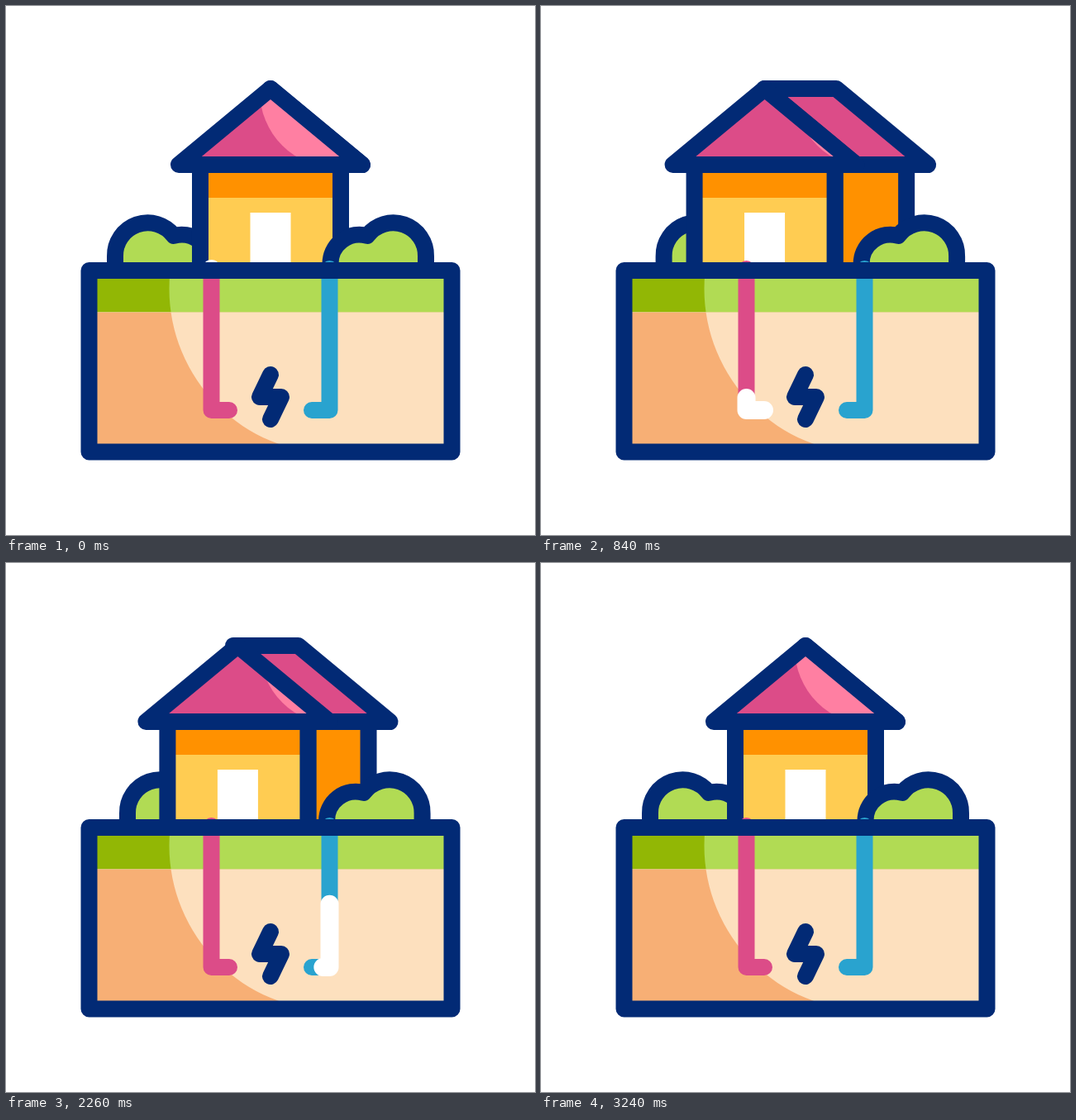
Animation, 640 px wide and 640 px high, one loop 3.6 s. Source, as an HTML page with a canvas:

```html
<!DOCTYPE html>
<html lang="en">
<head>
<meta charset="utf-8">
<title>Geothermal house</title>
<style>
html, body { margin: 0; width: 100%; height: 100%; overflow: hidden; background: #fff; }
canvas { display: block; width: 640px; height: 640px; }
</style>
</head>
<body>
<canvas width="640" height="640"></canvas>
<script>
const ctx = document.querySelector('canvas').getContext('2d');
const LOOP = 3600, FLOW = 820;
const NAVY = '#022a75', PINK = '#dc4c88', ROSE = '#ff7fa2', ORANGE = '#ff9100',
  YELLOW = '#ffcc52', GREEN = '#b1db54', MOSS = '#92b705', CLAY = '#f7af75',
  SAND = '#fde0be', BLUE = '#29a3cf', WHITE = '#fff';

const bush = new Path2D('M508 320V303A39.5 39.5 0 0 0 437 278A35 35 0 0 0 392.5 312V320Z');
const bolt = new Path2D('M0 -27L-13 0H13L0 27');
const hotPipe = new Path2D('M248.5 318V489H270');
const coldPipe = new Path2D('M370 489H391.5V318');
const BOLT_LENGTH = 86, PIPE_LENGTH = 192.5;

const clamp = u => Math.min(1, Math.max(0, u));
const progress = (t, start, length) => clamp((t - start) / length);
const smooth = u => u * u * (3 - 2 * u);
const easeSine = u => (1 - Math.cos(Math.PI * u)) / 2;

function rect(color, x, y, w, h) {
  ctx.fillStyle = color;
  ctx.fillRect(x, y, w, h);
}

function disc(color, x, y, r) {
  ctx.fillStyle = color;
  ctx.beginPath();
  ctx.arc(x, y, r, 0, 2 * Math.PI);
  ctx.fill();
}

function stroke(path, color = NAVY, width = 20) {
  ctx.strokeStyle = color;
  ctx.lineWidth = width;
  ctx.stroke(path);
}

function shape(path, color) {
  ctx.fillStyle = color;
  ctx.fill(path);
  stroke(path);
}

function at(x, y, draw) {
  ctx.save();
  ctx.translate(x, y);
  draw();
  ctx.restore();
}

// White pulse whose head and tail travel along a path of the given length
function pulse(path, length, t, headStart, tailStart) {
  const head = easeSine(progress(t, headStart, FLOW));
  const tail = easeSine(progress(t, tailStart, FLOW));
  if (head <= 0 || tail >= 1) return;
  ctx.setLineDash([Math.max(0.01, (head - tail) * length), 9999]);
  ctx.lineDashOffset = -tail * length;
  stroke(path, WHITE, 22);
  ctx.setLineDash([]);
}

// How far the front and the back of the house have turned, 0 to 1
function turn(t) {
  const q = progress(t, 0, 1200);
  const out = smooth(1 - (1 - q) ** 2);
  const u = progress(t, 2000, 1220);
  const back = smooth(u);
  const front = (back + Math.sin(u * Math.PI / 2)) / 2;
  return { front: out * 0.97 * (1 - front) + 0.03 * q * (1 - front), back: out * (1 - back) };
}

function drawHouse(front, back) {
  const dx = -51 * front, bx = 38 * back;

  const side = new Path2D(`M${405 + dx} 192H${405 + bx}V320H${405 + dx}Z`);
  shape(side, ORANGE);
  const sideRoof = new Path2D(`M${320 - 51 * back} 100H${320 + bx}L${431 + bx} 192H${431 - 51 * back}Z`);
  shape(sideRoof, PINK);

  at(dx, 0, () => {
    rect(YELLOW, 235, 192, 170, 128);
    rect(ORANGE, 235, 192, 170, 40);
    rect(WHITE, 295.5, 250, 49, 70);
    stroke(new Path2D('M235 192V320M405 192V320'));
  });

  const gable = new Path2D(`M${320 + dx} 100L${431 + dx} 192H${209 + dx}Z`);
  ctx.fillStyle = PINK;
  ctx.fill(gable);
  ctx.save();
  ctx.clip(gable);
  disc(ROSE, 400, 103, 93);
  ctx.restore();
  stroke(gable);
}

function drawGround(t) {
  const halves = [[MOSS, CLAY], [GREEN, SAND]];
  halves.forEach(([grass, soil], lit) => {
    ctx.save();
    if (lit) {
      ctx.beginPath();
      ctx.arc(397, 342, 199.5, 0, 2 * Math.PI);
      ctx.rect(397, 320, 143, 220);
      ctx.clip();
    }
    rect(grass, 101, 320, 438.5, 50.5);
    rect(soil, 101, 370.5, 438.5, 169);
    ctx.restore();
  });

  stroke(hotPipe, PINK);
  pulse(hotPipe, PIPE_LENGTH, t, 0, 256);
  stroke(coldPipe, BLUE);
  pulse(coldPipe, PIPE_LENGTH, t, 1847, 2122);

  at(320, 473, () => {
    const swing = Math.sin(Math.PI * progress(t, 1720, 480));
    ctx.rotate(-0.16 * swing);
    stroke(bolt);
    pulse(bolt, BOLT_LENGTH, t, 920, 1180);
  });

  const frame = new Path2D('M100.5 320H539.5V539.5H100.5Z');
  stroke(frame);
}

function draw(t) {
  const { front, back } = turn(t);
  rect(WHITE, 0, 0, 640, 640);
  ctx.lineJoin = ctx.lineCap = 'round';

  at(640 + 17 * back, 0, () => {
    ctx.scale(-1, 1);
    shape(bush, GREEN);
  });
  drawHouse(front, back);
  at(-5 * back, 0, () => shape(bush, GREEN));
  drawGround(t);
}

const begin = performance.now();
function tick() {
  draw((performance.now() - begin) % LOOP);
  requestAnimationFrame(tick);
}
tick();
</script>
</body>
</html>
```
